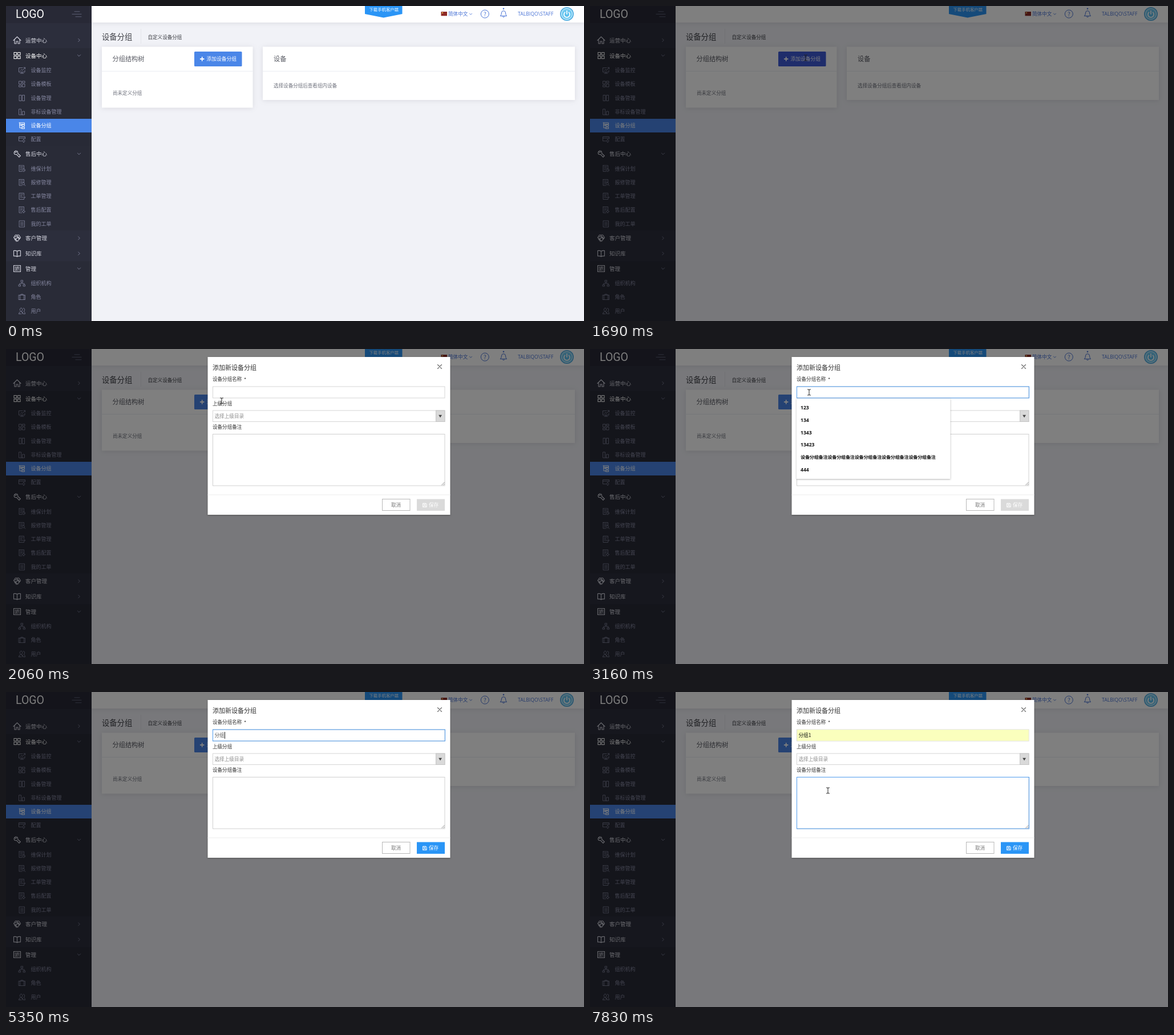
An HTML page for the animation above (8000 ms loop, 1013 by 553 pixels).

```html
<!DOCTYPE html>
<html>
<head>
<meta charset="utf-8">
<title>设备分组</title>
<style>
  html, body { margin: 0; width: 100%; height: 100%; overflow: hidden; background: #f1f2f7; }
  svg { display: block; width: 100vw; height: 100vh; }
  text { font-family: "Noto Sans CJK SC", "Noto Sans CJK", "Noto Sans", sans-serif; white-space: pre; }
  .logo { font-family: Roboto, sans-serif; }
  .latin { font-family: "Open Sans", sans-serif; }
  .mono { font-family: "Liberation Mono", monospace; }
  .card { filter: drop-shadow(0 1px 4px rgba(69, 65, 78, .13)); }
  .pop { filter: drop-shadow(0 1px 1.5px rgba(0, 0, 0, .3)); }
  .line { fill: none; stroke-linejoin: round; stroke-linecap: round; }
</style>
</head>
<body>
<svg id="stage" viewBox="0 0 1013 553" xmlns="http://www.w3.org/2000/svg"></svg>
<script>
const LOOP = 8000;
const TICK = 77.7;
const BLUE = '#4a86e8', LINK = '#4a74d6', AZURE = '#2a95f6', RING = '#4f9bee';

// Drawing helpers
const text = (x, cy, size, fill, str, extra = '') =>
  `<text x="${x}" y="${cy + size * .38}" font-size="${size}" fill="${fill}" ${extra}>${str}</text>`;
const rect = (x, y, w, h, fill, extra = '') =>
  `<rect x="${x}" y="${y}" width="${w}" height="${h}" fill="${fill}" ${extra}/>`;
const frame = (x, y, w, h, stroke, extra = '') =>
  rect(x + .5, y + .5, w - 1, h - 1, 'none', `stroke="${stroke}" ${extra}`);
const path = (d, stroke, width = 1, x = 0, y = 0, extra = '') =>
  `<path class="line" d="${d}" stroke="${stroke}" stroke-width="${width}" transform="translate(${x} ${y})" ${extra}/>`;
const shape = (d, fill, extra = '') => `<path d="${d}" fill="${fill}" ${extra}/>`;
const group = (id, body) => `<g id="${id}">${body}</g>`;
const medium = 'font-weight="500"', bold = 'font-weight="700"';

const PAGE = 'M-5-5.5H3.5V0M-5-5.5V5H0M-3-3H1.5M-3-.5H1M-3 2H-1';
const CHEVRON = { '>': 'M-1.3-2.6L1.3 0L-1.3 2.6', 'v': 'M-2.6-1.3L0 1.3L2.6-1.3' };
const ICON = {
  home: 'M-6.5 .5L0-6L6.5 .5M-4.5-1V6H-1.5V2H1.5V6H4.5V-1',
  grid: 'M-5.5-5.5H-1V-1H-5.5ZM1-5.5H5.5V-1H1ZM-5.5 1H-1V5.5H-5.5ZM1 1H5.5V5.5H1Z',
  screen: 'M1-4.5H-5.5V3H5V0M0 3V5M-3 5.2H3M-3 .5L-1-1.5L1 0L5.5-5M3-5H5.5V-2.5',
  tiles: 'M-5-5H-1V0H-5ZM1-5H5V-2H1ZM-5 2H-1V5H-5ZM1 0H5V5H1Z',
  racks: 'M-4.5-5H-1V5H-4.5ZM1-5H4.5V5H1Z',
  bars: 'M-5-5H-1.5V5H-5ZM1-1H4.5V5H1ZM-1 5H1',
  tree: 'M-4-5V4H0M-4-.5H0M-5-5H4.5V-2.5H-4M0-1.8H4.5V1H0ZM0 2.8H4.5V5.3H0Z',
  config: 'M0 3H-5.5V-4.5H5.5V-1M-5.5-2H5.5M3 .8A2 2 0 1 1 2.9 .8M3 0V-.5M3 5V5.5',
  wrench: 'M-1.5-5.5A4 4 0 0 0-5 0A4 4 0 0 0-1 1L3.5 5.8L5.8 3.5L1-1A4 4 0 0 0 0-4.8L-2.2-2.4L-4.3-3.4',
  clock: PAGE + 'M3 0A2.6 2.6 0 1 1 2.9 0M3 1.5V3H4.2',
  search: PAGE + 'M2.3-.2A2.1 2.1 0 1 1 2.2-.2M3.8 3.3L5.8 5.5',
  send: 'M3.5-1V-5.5H-5V5.5H3.5V4M-3-3H1.5M-3-.5H0M-3 2H5.5M4 .5L5.5 2L4 3.5',
  gear: PAGE + 'M3 .8A1.9 1.9 0 1 1 2.9 .8M3 0V.8M3 4.6V5.4M.5 2.7H1.1M4.9 2.7H5.5',
  list: 'M-4.5-5.5H4.5V5.5H-4.5ZM-2.5-2.5H2.5M-2.5 0H2.5M-2.5 2.5H2.5',
  shake: 'M-6-1L-3-5.5H3L6-1L1 5.5L-6-1M-3.5-2L0-4L5 1M-3 2L1-1.5L3.5 2.5M-4.5 2L-1 6',
  book: 'M0-4V5.5M0-4Q-2-5.5-6-5V4.5Q-2 4 0 5.5Q2 4 6 4.5V-5Q2-5.5 0-4',
  slider: 'M-6-5.5H6V5.5H-6ZM-4-2.5H0M2.5-2.5H4M-4 .3H-2.5M0 .3H4M-4 3H1M3 3H4M1.2-3.5V-1.5M-1.2-.7V1.3',
  org: 'M-1.5-5.5H1.5V-2.5H-1.5ZM0-2.5V0M-4 2V0H4V2M-5.5 2.3H-2.5V5H-5.5ZM2.5 2.3H5.5V5H2.5Z',
  role: 'M-5.5-3.5H5.5V4.5H-5.5ZM-2-3.5V-5H2V-3.5M-3.5-3.5V4.5M3.5-3.5V4.5',
  users: 'M-1.5-5.3A2.3 2.8 0 1 0-1.4-5.3M-5.5 5Q-5.5 1.5-2.5 1M-.5 1Q2 1.5 2 5ZM-5.5 5H-1M2.2-5A2.3 2.8 0 0 1 3 .5Q5.5 1.5 5.5 5H3.5'
};

const MENU = [
  [60, '运营中心', 'home', '>'], [87, '设备中心', 'grid', 'v'],
  [113, '设备监控', 'screen'], [137, '设备模板', 'tiles'], [161.5, '设备管理', 'racks'],
  [186, '非标设备管理', 'bars'], [234, '配置', 'config'],
  [259.5, '售后中心', 'wrench', 'v'], [285.5, '维保计划', 'clock'], [310, '报修管理', 'search'],
  [334, '工单管理', 'send'], [358, '售后配置', 'gear'], [382.5, '我的工单', 'list'],
  [407.5, '客户管理', 'shake', '>'], [434.5, '知识库', 'book', '>'], [461, '管理', 'slider', 'v'],
  [487, '组织机构', 'org'], [511, '角色', 'role'], [535.5, '用户', 'users']
];

function menuItem([cy, label, icon, arrow]) {
  if (!arrow) return path(ICON[icon], '#8587a0', .8, 28, cy) + text(43.5, cy, 9, '#8587a0', label);
  const ink = icon === 'grid' ? '#fff' : '#d3d4de';
  return path(ICON[icon], ink, 1.1, 19.5, cy) + path(CHEVRON[arrow], '#7e8199', .9, 128, cy) +
    text(34, cy, 9.5, ink, label, icon === 'grid' ? medium : '');
}

const sidebar = rect(0, 0, 150, 553, '#2c2e3c') + rect(0, 0, 150, 30, '#282936') +
  rect(0, 74, 150, 172, '#282a36') + rect(0, 246, 150, 148, '#292b37') + rect(0, 448, 150, 105, '#292b37') +
  `<text x="17" y="21" font-size="19.500" fill="#fff" class="logo">LOGO</text>` +
  path('M4 0H13M0 4.500H16M6 9H16', '#5d6075', 1, 116, 9.8) + MENU.map(menuItem).join('') +
  rect(0, 198, 150, 24, BLUE) + path(ICON.tree, '#fff', 1, 28, 210) + text(43.5, 210, 9, '#fff', '设备分组', medium);

const header = rect(150, 0, 863, 29, '#fff', 'class="card"') +
  shape('M629 0H694.500V14L661.700 20.500L629 14Z', AZURE) + text(636.5, 6, 7.35, '#fff', '下载手机客户端', medium) +
  rect(762.5, 10, 10.5, 7.3, '#8e2a26') + rect(764, 11, 2, 2, '#e0b64a') +
  text(775, 14, 8.6, LINK, '简体中文') + path('M-2-1L0 1L2-1', LINK, .9, 814.5, 14.2) +
  `<circle cx="839.300" cy="14" r="7" fill="none" stroke="${LINK}"/>` +
  text(839.3, 14, 10, LINK, '?', 'text-anchor="middle"') +
  path('M-5.500 4H5.500Q3.500 2 3.500-1.500A3.500 3.500 0 0 0-3.500-1.500Q-3.500 2-5.500 4M-1.500 5.500Q0 7 1.500 5.500', LINK, 1, 872, 13.5) +
  `<circle cx="872" cy="4.800" r="1.300" fill="${LINK}"/>` +
  text(897, 14, 8.7, LINK, 'TALBIQO\\STAFF', 'class="latin"') +
  `<circle cx="983" cy="14" r="12" fill="url(#sky)"/><circle cx="983" cy="14" r="9.500" fill="none" stroke="#d8f2ff"/>` +
  path('M-3.3-3.3A5 5 0 1 0 3.3-3.3M0-6V-.5', '#fff', 1.7, 983, 14.5);

const content = text(168, 53.5, 13.3, '#3f4047', '设备分组') + rect(236, 40, 1, 26, '#e3e4ea') +
  text(248.5, 54.5, 8.55, '#3f4047', '自定义设备分组') +
  rect(168, 71.5, 264.5, 107, '#fff', 'class="card"') + rect(168, 114, 264.5, 1, '#ebedf2') +
  text(186.5, 93, 11.2, '#575962', '分组结构树') + text(187, 153, 8.55, '#6f727d', '尚未定义分组') +
  rect(330, 80, 83.5, 26, BLUE, 'rx="1.500" id="add"') + path('M-3 0H3M0-3V3', '#fff', 1.8, 343.7, 93) +
  text(351.5, 93, 8.75, '#fff', '添加设备分组', medium) +
  rect(450, 71.5, 547, 93.5, '#fff', 'class="card"') + rect(450, 114, 547, 1, '#ebedf2') +
  text(469, 93, 11.2, '#575962', '设备') + text(469, 140, 8.55, '#6f727d', '选择设备分组后查看组内设备');

const saveButton = (id, fill) => group(id, rect(720, 263.5, 49, 20.5, fill) +
  path('M-3.200-3.200H2L3.200-2V3.200H-3.200ZM-1.800-3V-1H1V-3M-1.800 3V.700H1.800V3', '#fff', .9, 734, 274.2) +
  text(741, 274, 8.6, '#fff', '保存', medium));

const modal = rect(353.5, 14, 425, 277, '#fff', 'class="pop"') +
  text(362, 32.5, 11, '#333', '添加新设备分组') + path('M-3.500-3.500L3.500 3.500M3.500-3.500L-3.500 3.500', '#666', 1.1, 760, 31) +
  text(362, 53, 8.55, '#333', '设备分组名称') + text(417, 54, 9, '#333', '*') +
  frame(362, 65.5, 407.5, 21, '#d5d5d5') + rect(362.8, 66.3, 406, 19.4, '#faffbd', 'id="filled"') +
  frame(362, 65.5, 408, 21, RING, 'id="inputRing"') +
  text(365.5, 76, 8.6, '#555', '', 'id="value"') + rect(366, 70, 1, 12, '#222', 'id="caret"') +
  text(362, 95.5, 8.55, '#333', '上级分组') +
  frame(362, 107.5, 407.5, 20.5, '#d5d5d5') + rect(753.5, 108, 15.5, 19.5, '#d9d9d9', 'stroke="#c4c4c4"') +
  shape('M758.200 115.800H764L761.100 120.500Z', '#444') + text(365.5, 118, 8.6, '#8d8d8d', '选择上级目录') +
  text(362, 137, 8.55, '#333', '设备分组备注') + frame(362, 149, 407.5, 91.5, '#d0d0d0') +
  frame(362, 149, 408, 91.5, RING, 'id="noteRing"') +
  path('M0 5L5 0M3 5L5 3', '#777', .8, 763.5, 234) + rect(369, 153, 1, 12, '#222', 'id="noteCaret"') +
  rect(353.5, 255.5, 425, 1, '#ededed') + frame(659, 263, 49.5, 21, '#b8b8b8') +
  text(675, 274, 8.6, '#777', '取消') + saveButton('saveOff', '#dadada') + saveButton('saveOn', AZURE);

const HISTORY = ['123', '134', '1343', '13423', '设备分组备注'.repeat(5), '444'];
const history = rect(362, 87, 269.5, 141, '#fff', 'class="pop"') +
  HISTORY.map((s, i) => text(369, 102.5 + i * 21.9, /\d/.test(s) ? 8.6 : 7.9, '#111', s, bold + ' class="latin"')).join('');
const match = rect(362, 87, 51, 31.5, '#fff', 'class="pop"') +
  rect(362, 92, 51, 21.5, '#e9ebee', 'id="matchHover"') + text(369, 102.5, 7.9, '#111', '分组1', bold);

// Input method panel
let seed = 7;
const rnd = () => (seed = seed * 16807 % 2147483647) / 2147483647;
const linen = Array.from({ length: 70 }, () => {
  const x = 378 + rnd() * 220, y = 89 + rnd() * 38;
  return `M${x.toFixed(1)} ${y.toFixed(1)}h${(3 + rnd() * 9).toFixed(1)}`;
}).join('');
const flower = (x, y, r, fill) => [0, 72, 144, 216, 288].map(a =>
  `<ellipse cx="${x}" cy="${y - r * .56}" rx="${r * .42}" ry="${r * .48}" fill="${fill}" stroke="#e3bcc2" stroke-width=".500" transform="rotate(${a + 15} ${x} ${y})"/>`
).join('') + `<circle cx="${x}" cy="${y}" r="${r * .16}" fill="#d99aa2"/>`;
const leaf = (x, y, angle, len, fill) =>
  shape(`M0 0Q${len * .5} ${-len * .45} ${len} 0Q${len * .5} ${len * .45} 0 0Z`, fill, `transform="translate(${x} ${y}) rotate(${angle})"`);
const bouquet = leaf(583, 103, -78, 17, '#9cc86a') + leaf(587, 98, -38, 24, '#74b03c') +
  leaf(586, 106, 2, 24, '#8dc456') + leaf(585, 109, 32, 24, '#74ab45') +
  leaf(590, 96, -12, 17, '#b3d886') + leaf(564, 104, -130, 12, '#b9d58e') +
  flower(566, 116, 12, '#f3d3d6') + flower(578, 107, 13, '#fcf2ee') + flower(585, 119, 9, '#f9e4e3');
const arrows = shape('M522.500 115V122L519 118.500Z', '#b9bd9a') + shape('M526 114.500V122.500L530 118.500Z', '#3a6b2a') +
  frame(533, 114, 9.5, 9.5, '#71904f') + shape('M535.300 117.500H540.300L537.800 120.500Z', '#3a6b2a');
const ime = rect(374.5, 87.5, 237.5, 41.5, 'url(#linen)', 'rx="7" id="imeBox" stroke="#d6cbae" class="pop"') +
  path(linen, '#cdbd98', .5, 0, 0, 'opacity=".500"') +
  group('imeSide', bouquet + arrows) + group('imeText', '');

const COMPOSE = [
  [4260, 'f', '发 分 烦 非 ′'], [4410, 'fe', '非 费 飞 肥 ′'], [4580, 'fen', '分 份 粉 芬 ′'],
  [4730, 'fenz', '分组 分子 粉 份 分'], [4880, 'fenzu', '分组 分 份 粉 奋']
];
function composeText([, typed, words]) {
  let x = 382;
  const items = words.split(' ').map((w, i) => {
    const ink = i ? '#3c7a2c' : '#f0544c';
    const s = text(x, 118.5, 9.6, ink, `${i + 1}.`, 'class="mono"') + text(x + 9.5, 118.5, 9.8, ink, w);
    x += 17 + 10 * w.length;
    return s;
  });
  return text(384, 99.5, 9, '#2f7a24', typed, 'class="mono"') +
    rect(384 + typed.length * 5.4 - .9, 94.5, 1, 10, '#f0544c') + items.join('');
}

const edge = 'stroke="#111" stroke-width=".800" stroke-linejoin="round"';
const pointer =
  group('arrow', shape('M0 0V9.500L2.300 7.400L3.800 11L5.300 10.400L3.800 7H6.800Z', '#fff', edge)) +
  group('hand', shape('M-1.200 8V1Q-1.200-.200 0-.200T1.200 1V5L4.500 5.800Q6 6.200 6 7.800L5 12.500H-1.600L-4.200 8.500Q-4.600 7.200-3.200 7.200Z', '#fff', edge)) +
  group('beam', path('M-2.500-5H-1Q0-5 0-4V4Q0 5-1 5H-2.500M2.500-5H1Q0-5 0-4M0 4Q0 5 1 5H2.500', '#222', 1));

document.getElementById('stage').innerHTML = `<defs>
  <radialGradient id="sky"><stop offset=".300" stop-color="#5cc0ee"/><stop offset=".800" stop-color="#7fd0f3"/><stop offset="1" stop-color="#3f9fd8"/></radialGradient>
  <linearGradient id="linen" x2="1" y2=".300"><stop stop-color="#ded2b4"/><stop offset=".500" stop-color="#eae1cb"/><stop offset="1" stop-color="#e0d6b8"/></linearGradient>
  </defs>` + rect(0, 0, 1013, 553, '#f1f2f7') + content + header + sidebar +
  rect(0, 0, 1013, 553, '#000', 'opacity=".500" id="overlay"') + group('modal', modal) +
  group('history', history) + group('match', match) + group('ime', ime) + group('pointer', pointer);

const $ = id => document.getElementById(id);
const show = (id, on) => $(id).setAttribute('visibility', on ? 'visible' : 'hidden');
const set = (id, name, v) => $(id).setAttribute(name, v);
const ramp = (t, from, len) => Math.min(1, Math.max(0, (t - from) / len));
const during = (t, from, to) => t >= from && t < to;

// Pointer path: time, x, y
const PATH = [
  [440, 671, 505], [1210, 377, 93], [1360, 378, 91], [2300, 378, 91], [2600, 384, 76],
  [6130, 384, 76], [6250, 393, 92.5], [6590, 393, 92.5], [7210, 417, 173], [LOOP, 417, 173]
];
function pointerAt(t) {
  const q = 440 + Math.floor((t - 440 + 10) / TICK) * TICK;
  const i = Math.max(1, PATH.findIndex(p => q < p[0]));
  const [t0, x0, y0] = PATH[i - 1], [t1, x1, y1] = PATH[i];
  const p = ramp(q, t0, t1 - t0), e = p * p * (3 - 2 * p);
  return [x0 + (x1 - x0) * e, y0 + (y1 - y0) * e];
}

let lastCompose;
function draw(t) {
  const [x, y] = pointerAt(t);
  const hover = during(t, 440, 1760) && x > 330 && x < 414 && y > 80 && y < 106;
  const kind = t < 1685 ? (hover ? 'hand' : 'arrow') : t >= 6200 && y < 150 ? 'arrow' : 'beam';
  set('pointer', 'transform', `translate(${x.toFixed(1)} ${y.toFixed(1)})`);
  const visible = t >= 440 && !during(t, 5350, 6060);
  for (const k of ['arrow', 'hand', 'beam']) show(k, visible && k === kind);
  set('add', 'fill', hover ? '#3f5bd8' : BLUE);

  show('overlay', t >= 1685);
  const m = ramp(t, 1740, 290), out = 1 - (1 - m) ** 2;
  set('modal', 'opacity', out);
  set('modal', 'transform', `translate(0 ${(out - 1) * 40})`);

  // Name field
  set('inputRing', 'opacity', ramp(t, 2610, 150) - ramp(t, 7290, 150));
  $('value').textContent = t < 5350 ? '' : t < 5660 ? '分组' : '分组1';
  const filled = t >= 6360;
  set('value', 'fill', filled ? '#111' : '#555');
  show('filled', filled);
  const blink = during(t, 2610, 5350) && Math.floor((t - 2610) / 550) % 2 === 0;
  show('caret', blink || during(t, 5350, 6210));
  set('caret', 'x', t < 5350 ? 366 : t < 5660 ? 383 : 388.5);
  show('saveOff', t < 5350);
  show('saveOn', t >= 5350);

  // Suggestions and input method
  show('history', during(t, 2690, 5350));
  show('match', during(t, 5500, 6590));
  show('matchHover', during(t, 6360, 6590));
  show('ime', during(t, 4260, 5350));
  const step = COMPOSE.filter(c => t >= c[0]).pop() || COMPOSE[0];
  if (step !== lastCompose) {
    lastCompose = step;
    const grow = step[0] >= 4730 ? 48 : 0;
    set('imeBox', 'width', 237.5 + grow);
    set('imeSide', 'transform', `translate(${grow} 0)`);
    $('imeText').innerHTML = composeText(step);
  }

  // Note field
  set('noteRing', 'opacity', ramp(t, 7290, 150));
  show('noteCaret', during(t, 7290, 7830));
}

const start = performance.now();
function tick() {
  draw((performance.now() - start + 6) % LOOP);
  requestAnimationFrame(tick);
}
tick();
</script>
</body>
</html>
```
